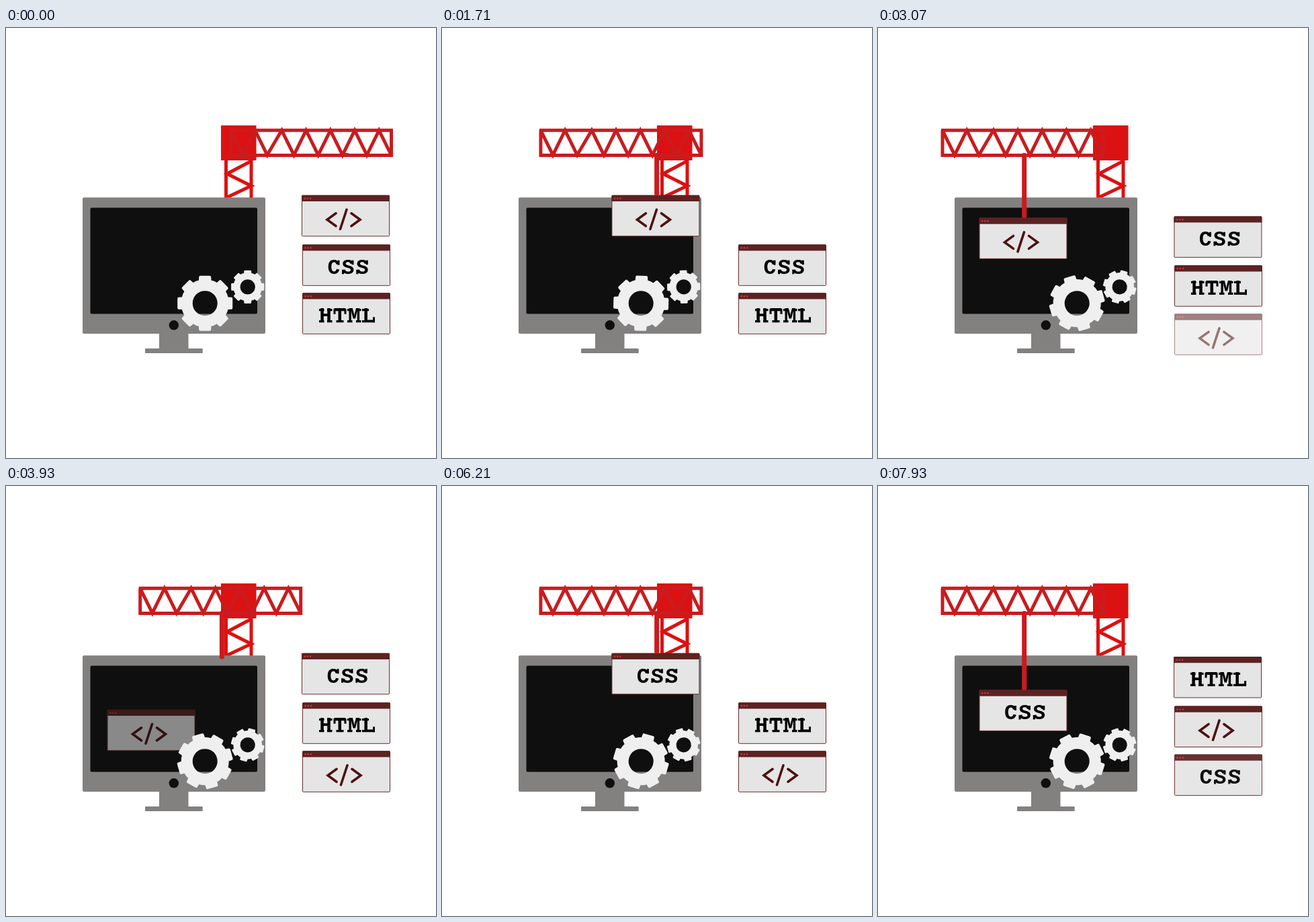
Recreate the animation shown at these times as an HTML page. Size 640 by 640 pixels, loop 8000 ms.

```html
<!DOCTYPE html>
<html lang="en">
<head>
<meta charset="utf-8">
<title>Website under construction</title>
<style>
  html, body { margin: 0; width: 100%; height: 100%; overflow: hidden; background: #fff; }
  svg { display: block; width: 100vw; height: 100vh; }
  text { font: bold 31px "Liberation Mono", "Courier New", monospace; text-anchor: middle; }
</style>
</head>
<body>
<svg viewBox="0 0 640 640">
  <defs>
    <g id="window">
      <rect x=".5" y=".5" width="130" height="60.5" rx="1" fill="#e5e5e5" stroke="#6a2c2c"/>
      <path d="M0 9.3V1.5Q0 0 1.5 0H129.500Q131 0 131 1.500V9.300Z" fill="#5c2222"/>
      <g fill="#d23a3a">
        <circle cx="4.700" cy="4.900" r="1.200"/><circle cx="8.800" cy="4.900" r="1.200"/><circle cx="13" cy="4.900" r="1.200"/>
      </g>
    </g>
    <g id="code">
      <use href="#window"/>
      <path d="M51 27 38 36.500 51 46M74 27 87 36.500 74 46M67 21.500 57.500 50.500" fill="none"
            stroke="#4f1010" stroke-width="3.600" stroke-linecap="round"/>
    </g>
    <!-- short strokes add the slab serifs -->
    <g id="css">
      <use href="#window"/>
      <text x="46.700 68 89.300" y="44">CSS</text>
      <path d="M54 23.500v7M75 23.500v6.500M60.500 37.500v6.500M96.300 23.500v6.500M81.800 37.500v6.500" stroke="#000" stroke-width="3"/>
    </g>
    <g id="html">
      <use href="#window"/>
      <text x="34.600 55.900 77.200 98.500" y="44">HTML</text>
      <path d="M25 25.300h7.500m4.500 0h7.500M25 42.300h7.500m4.500 0h7.500M47 25.300h18M50.500 42.300h11
               M67 25.300h6m8.500 0h6M67 42.300h7.500m5.500 0h7.500M89 25.300h10M89 42.300h19"
            stroke="#000" stroke-width="3.300"/>
      <path d="M48 24v7.500M64 24v7.500M106.500 44v-8" stroke="#000" stroke-width="3"/>
    </g>
    <g id="gear" fill="#efefef">
      <circle r="27" fill="none" stroke="#efefef" stroke-width="17"/>
    </g>
  </defs>

  <g fill="none" stroke="#dc1112" stroke-width="5">
    <path d="M327.500 195V254M365 195V254M365 198 329 217 365 235 329 252"/>
  </g>
  <rect x="320" y="145" width="52.500" height="52" fill="#dc1112"/>

  <g fill="#838080">
    <rect x="114" y="252.300" width="272" height="202.700" rx="2"/>
    <rect x="228" y="454" width="43.500" height="24"/>
    <rect x="207" y="477" width="85.700" height="7" rx="1"/>
  </g>
  <g fill="#0f0f0f">
    <rect x="125.500" y="267.500" width="248.500" height="158" rx="2"/>
    <circle cx="249.800" cy="442.300" r="7.200"/>
  </g>

  <use id="slot0"/><use id="slot1"/><use id="slot2"/>
  <use id="load"/>
  <use id="bigGear" href="#gear"/>
  <use id="smallGear" href="#gear"/>
  <rect id="cable" y="186" width="7" rx="2.500" fill="#cb1a1e"/>
  <path id="arm" fill="none" stroke="#c91c1f" stroke-width="5"/>
</svg>
<script>
const LOOP = 8000, FRAMES = 112, CYCLE = 4500;
const SLOT_Y = [248.8, 322.3, 394.3, 466.8];
const CARDS = ['#code', '#css', '#html'];
const ARM_TRAVEL = 238.5, TROLLEY_TRAVEL = 51, DROP_SPEED = 0.0588;
const CABLE_TOP = 190, HOOK_Y = 249.5;

const el = id => document.getElementById(id);
const lerp = (a, b, u) => a + (b - a) * u;
const progress = (t, from, to) => Math.min(1, Math.max(0, (t - from) / (to - from)));
const swing = u => u + 0.09 * Math.sin(2 * Math.PI * u) / (2 * Math.PI);

function set(id, attributes) {
  for (const [name, value] of Object.entries(attributes)) el(id).setAttribute(name, value);
}

function placeCard(id, card, x, y, opacity = 1) {
  set(id, { href: CARDS[card % 3], transform: `translate(${x} ${y})`, opacity });
}

function build() {
  for (let angle = 0; angle < 360; angle += 45) {
    el('gear').insertAdjacentHTML('beforeend',
      `<path d="M-9.500-30-9-39Q-9-41-7-41H7Q9-41 9-39L9.500-30Z" transform="rotate(${angle})"/>`);
  }
  const lattice = Array.from({ length: 14 }, (_, i) =>
    `${334.5 + 18.1 * i + (i > 3 ? 3.5 : 0)} ${i % 2 ? 189 : 152.3}`);
  set('arm', { d: `M332.500 152.300H573.500V189.500H334.500V152.300L${lattice.join('L')}` });
}

function draw(time) {
  const cycle = Math.floor(time / CYCLE);
  const t = time % CYCLE;

  const out = swing(progress(t, 571, 2000));
  const back = swing(progress(t, 3500, 4500));
  const armX = -ARM_TRAVEL * (out - back);
  const trolleyX = -TROLLEY_TRAVEL * progress(t, 2000, 2500);
  const drop = DROP_SPEED * Math.max(0, t - 2500);

  let hook = lerp(CABLE_TOP, HOOK_Y, progress(t, 0, 571)) + drop;
  if (t > 3500) hook = lerp(HOOK_Y + DROP_SPEED * 1000, CABLE_TOP, progress(t, 3500, 4500));

  set('arm', { transform: `translate(${armX} 0)` });
  set('cable', { x: 503.7 + armX + trolleyX, height: hook - 186 });
  placeCard('load', cycle, 440 - ARM_TRAVEL * out + trolleyX, SLOT_Y[0] + drop, 1 - progress(t, 3500, 4500));

  // the queue moves up one slot while the used card fades in at its end
  const rise = progress(t, 2500, 3500);
  for (let i = 0; i < 3; i++) {
    placeCard('slot' + i, cycle + i + 1, i ? 441 : lerp(441, 440, rise),
      lerp(SLOT_Y[i + 1], SLOT_Y[i], rise), i === 2 ? rise : 1);
  }

  const turn = time * 360 / 6750;
  set('bigGear', { transform: `translate(296.200 409.700) rotate(${turn})` });
  set('smallGear', { transform: `translate(359.700 385.300) scale(.6) rotate(${-turn})` });
}

function tick(now) {
  // stepped at 14 pictures per second
  const frame = Math.floor((now % LOOP + 5) * FRAMES / LOOP) % FRAMES;
  draw(frame * LOOP / FRAMES);
  requestAnimationFrame(tick);
}

build();
draw(0);
requestAnimationFrame(tick);
</script>
</body>
</html>
```
